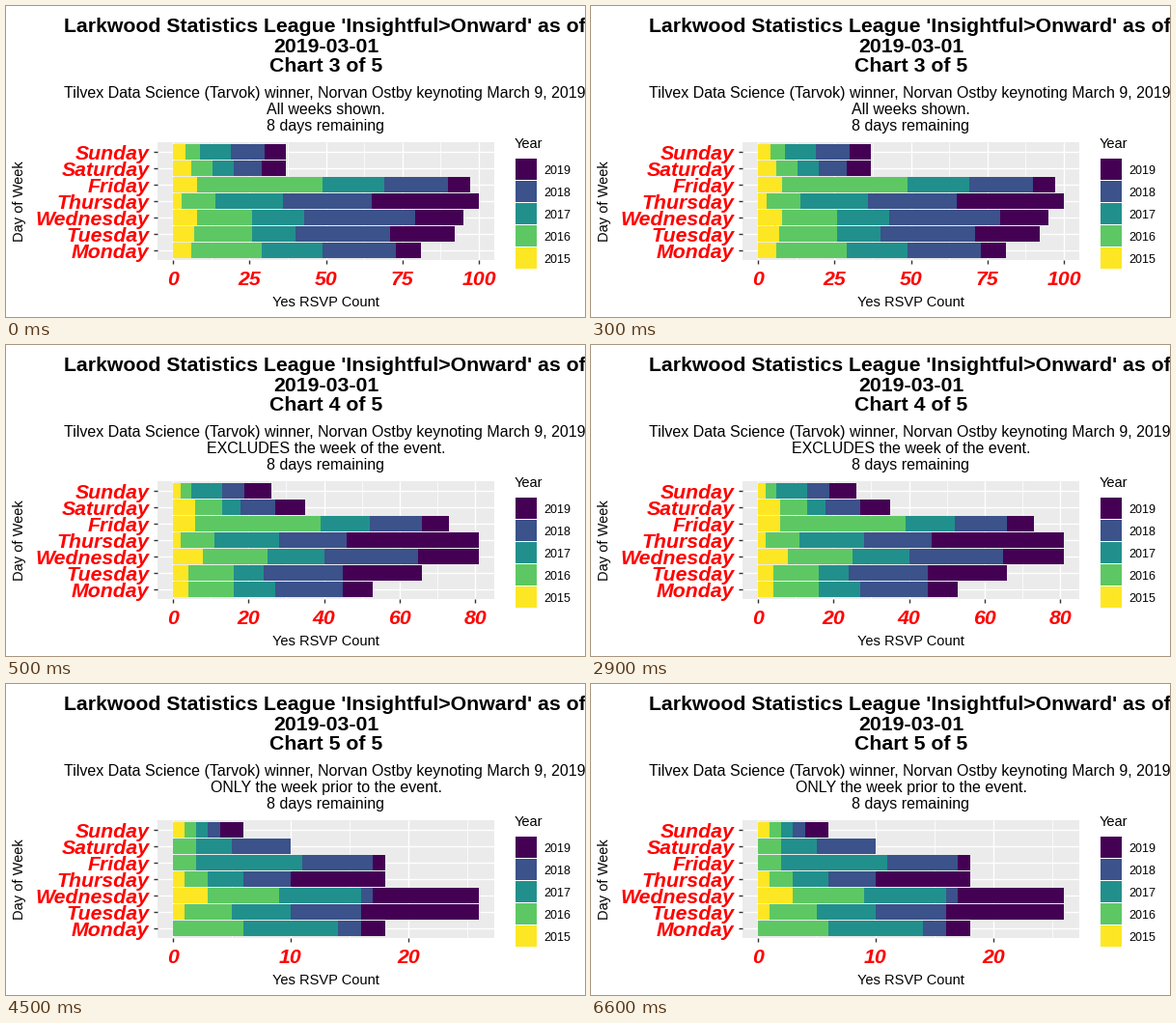
Animation of 600x322 px, one loop 8000 ms. Source, as a matplotlib script:

```python
import matplotlib.pyplot as plt
from matplotlib.animation import FuncAnimation
from matplotlib.patches import Rectangle

W, H, DPI = 600, 322, 100
PX = 72 / DPI  # points per pixel
LEFT, RIGHT, TOP, BOTTOM = 157, 506, 141, 263
ROW = 17
ZERO = LEFT + (RIGHT - LEFT) * 0.05 / 1.1
SPAN = (RIGHT - LEFT) / 1.1
MID = (LEFT + RIGHT) / 2

DAYS = ["Sunday", "Saturday", "Friday", "Thursday",
        "Wednesday", "Tuesday", "Monday"]
COLORS = ["#fde725", "#5dc863", "#21908c", "#3b528b", "#440154"]

# Per chart: subtitle, tick step and running totals 2015..2019 by day
CHARTS = [
    ("All weeks shown.", 25, [
        (4, 9, 19, 30, 37), (6, 13, 20, 29, 37), (8, 49, 69, 90, 97),
        (3, 14, 36, 65, 100), (8, 26, 43, 79, 95), (7, 26, 40, 71, 92),
        (6, 29, 49, 73, 81)]),
    ("EXCLUDES the week of the event.", 20, [
        (2, 5, 13, 19, 26), (6, 13, 18, 27, 35), (6, 39, 52, 66, 73),
        (2, 11, 28, 46, 81), (8, 25, 40, 65, 81), (4, 16, 24, 45, 66),
        (4, 16, 27, 45, 53)]),
    ("ONLY the week prior to the event.", 10, [
        (1, 2, 3, 4, 6), (0, 2, 5, 10, 10), (0, 2, 11, 17, 18),
        (1, 3, 6, 10, 18), (3, 9, 16, 17, 26), (1, 5, 10, 16, 26),
        (0, 6, 14, 16, 18)]),
]

STEP = 500
FRAMES = 16
STARTS = (0, 500, 4500)

plt.rcParams["font.family"] = "Liberation Sans"
fig = plt.figure(figsize=(W / DPI, H / DPI), dpi=DPI, facecolor="white")
ax = fig.add_axes([0, 0, 1, 1])
ax.set_xlim(0, W)
ax.set_ylim(H, 0)
ax.axis("off")


def text(x, y, s, px, ha="center", va="baseline", **kw):
    return ax.text(x, y, s, fontsize=px * PX, ha=ha, va=va, **kw)


def box(x0, y0, x1, y1, color, z=3):
    return ax.add_patch(Rectangle((x0, y0), x1 - x0, y1 - y0, facecolor=color,
                                  linewidth=0, antialiased=False, zorder=z))


def line(x0, y0, x1, y1, px, color="white", z=2):
    return ax.plot([x0, x1], [y0, y1], color=color, linewidth=px * PX,
                   solid_capstyle="butt", zorder=z)[0]


def title(y, s, x=MID, ha="center"):
    return text(x, y, s, 21.33, ha, weight="bold")


def red(x, y, s, ha="center"):
    return text(x, y, s, 21.33, ha, weight="bold", style="italic", color="red")


def draw_static():
    title(27, "Larkwood Statistics League 'Insightful>Onward' as of", 60, "left")
    title(48, "2019-03-01")
    text(60, 95, "Tilvex Data Science (Tarvok) winner, Norvan Ostby "
         "keynoting March 9, 2019", 16, "left")
    text(MID, 129, "8 days remaining", 16)
    text(MID, 311, "Yes RSVP Count", 14.67)
    text(21, (TOP + BOTTOM) / 2, "Day of Week", 14.67, "right", "center",
         rotation=90)

    box(LEFT, TOP, RIGHT, BOTTOM, "#ebebeb", 1)
    for i, day in enumerate(DAYS):
        y = TOP + 10 + i * ROW
        line(LEFT, y, RIGHT, y, 1.4)
        line(LEFT - 4, y, LEFT, y, 1.4, "#333333")
        red(148.5, y + 8, day, "right")

    text(527, 147, "Year", 14.67, "left")
    for i, color in enumerate(reversed(COLORS)):
        y = 158 + 23 * i
        box(528, y, 550, y + 22, color)
        text(557, y + 16, str(2019 - i), 12.5, "left")


def draw_chart(n, subtitle, step, rows):
    top = max(r[-1] for r in rows)

    def sx(v):
        return ZERO + SPAN * v / top

    parts = [title(68, f"Chart {n} of 5"), text(MID, 112, subtitle, 16)]
    for k in range(5):
        x = sx(k * step)
        if x < RIGHT:
            parts += [line(x, TOP, x, BOTTOM, 1.4),
                      line(x, BOTTOM, x, BOTTOM + 4, 1.4, "#333333"),
                      red(x, 289, str(k * step))]
        x = sx((k + 0.5) * step)
        if x < RIGHT:
            parts.append(line(x, TOP, x, BOTTOM, 0.7))
    for i, row in enumerate(rows):
        y = TOP + 2 + i * ROW
        for a, b, color in zip((0,) + row, row, COLORS):
            if b > a:
                parts.append(box(round(sx(a)), y, round(sx(b)), y + 16, color))
    return parts


draw_static()
charts = [draw_chart(3 + k, *c) for k, c in enumerate(CHARTS)]


def update(i):
    now = sum(i * STEP >= s for s in STARTS) - 1
    for k, parts in enumerate(charts):
        for p in parts:
            p.set_visible(k == now)
    return []


anim = FuncAnimation(fig, update, frames=FRAMES, init_func=lambda: update(0),
                     interval=STEP, repeat=True, repeat_delay=0)
plt.show()
```
